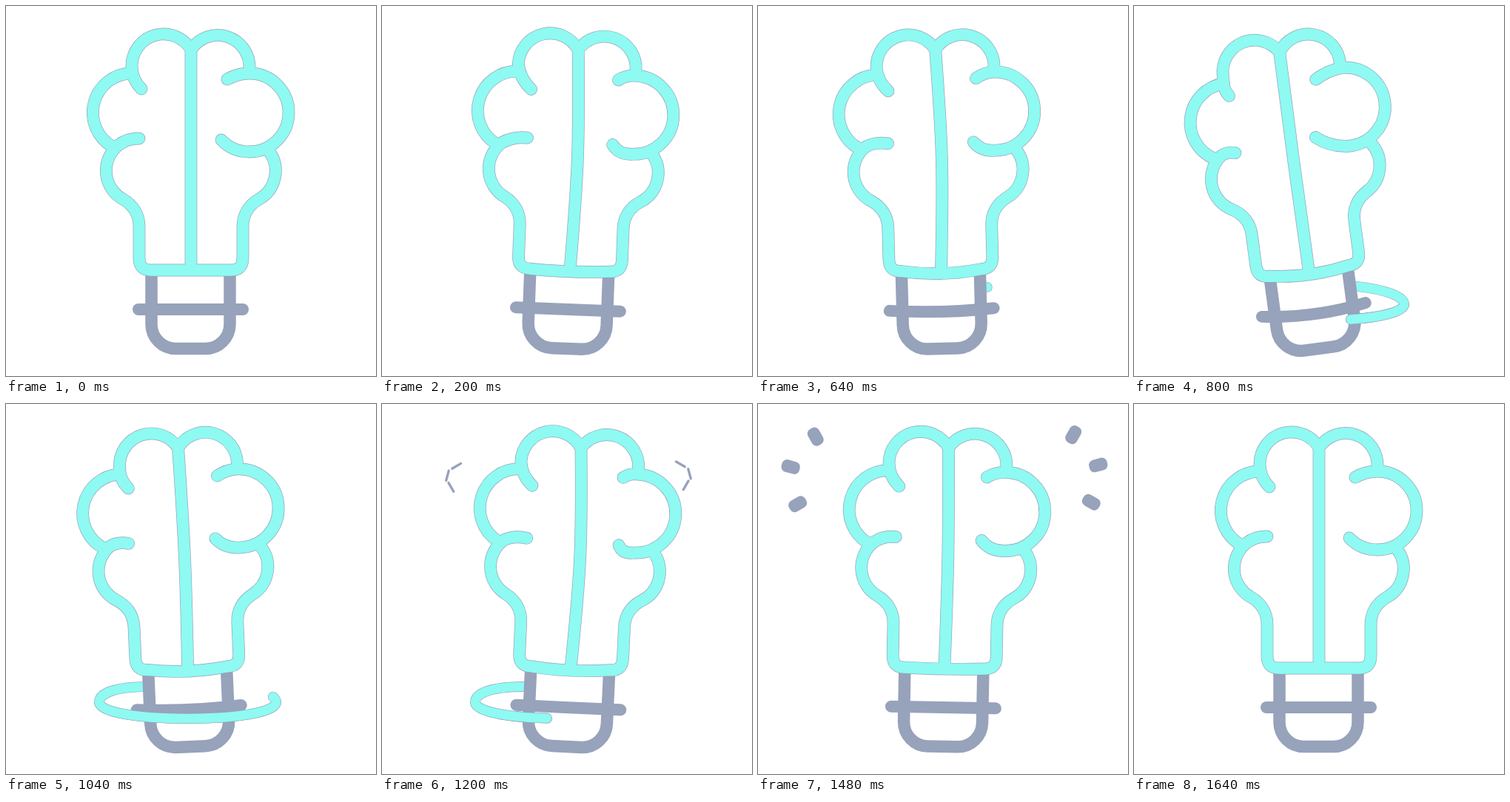
Recreate the animation shown at these times as an HTML page with a canvas. Size 500 by 500 pixels, loop 2.16 s.

```html
<!DOCTYPE html>
<html lang="en">
<head>
<meta charset="utf-8">
<title>Bright idea</title>
<style>
  html, body { margin: 0; width: 100%; height: 100%; overflow: hidden; background: #fff; }
  canvas { display: block; width: 100vw; height: 100vh; }
</style>
</head>
<body>
<canvas id="stage" width="500" height="500"></canvas>
<script>
const ctx = document.getElementById('stage').getContext('2d');
const CYAN = '#8efaf2', GRAY = '#97a2bb';
const LOOP = 2160, STEP = 40, RAD = Math.PI / 180;

// angle, then x/y shifts of the four fold tips, then bends of midline, rim and bar
const POSES = [
  [0, [0, 0, 0, 0, 0, 0, 0, 0, 0, 0, 0, 0]],
  [440, [5, 13, 6, 13.5, 3, 16, -3, 24, 10, 11, 4, 0]],
  [840, [-8, -9, -4, -8, 7, -6, 3, -9, -2, -1, 5, 6]],
  [1240, [3, 4, 1, 3, 5, 10.5, -3, 17, 7, 6, 3, 0]],
  [1640, [0, 0, 0, 0, 0, 0, 0, 0, 0, 0, 0, 0]]
];

// center and outward direction of the rays on the left side
const RAYS = [[87.5, 61, 240], [63, 90, 195], [70.5, 125.5, 150]];

const SWIRL = new Path2D('M302 379C338 383 365 392 365 403C365 417 310 425 245 425' +
  'C180 425 126 417 126 403C126 390 150 382 192 382');
const SWIRL_LENGTH = 394;

function ease(t, from, to) {
  const u = Math.min(1, Math.max(0, (t - from) / (to - from)));
  return u * u * (3 - 2 * u);
}

function poseAt(t) {
  let i = 0;
  while (i < POSES.length - 2 && t > POSES[i + 1][0]) i++;
  const [from, a] = POSES[i], [to, b] = POSES[i + 1];
  const k = ease(t, from, to);
  return a.map((v, n) => v + (b[n] - v) * k);
}

function stroke(path, color, width, cap = 'round') {
  ctx.lineCap = cap;
  ctx.lineJoin = 'round';
  ctx.strokeStyle = color;
  ctx.lineWidth = width;
  ctx.stroke(path);
}

function drawSwirl(t) {
  const head = ease(t, 600, 1080) * SWIRL_LENGTH;
  const tail = ease(t, 900, 1460) * SWIRL_LENGTH;
  if (head - tail < 0.5) return;
  ctx.save();
  ctx.setLineDash([head - tail, 1000]);
  ctx.lineDashOffset = -tail;
  stroke(SWIRL, GRAY, 13.8);
  stroke(SWIRL, CYAN, 12.6);
  ctx.restore();
}

function drawRays(t) {
  const head = ease(t, 1160, 1440) * 60, tail = ease(t, 1280, 1640) * 60;
  if (head - tail < 0.5) return;
  ctx.fillStyle = GRAY;
  for (const side of [1, -1]) {
    for (const [x, y, angle] of RAYS) {
      ctx.save();
      if (side < 0) {
        ctx.translate(504, -2.5);
        ctx.scale(-1, 1);
      }
      ctx.translate(x, y);
      ctx.rotate(angle * RAD);
      ctx.beginPath();
      ctx.roundRect(tail - 28, -8.5, head - tail, 17, Math.min(7, (head - tail) / 2));
      ctx.fill();
      ctx.restore();
    }
  }
}

function drawBase(barBend) {
  stroke(new Path2D('M196.5 358V430A33 33 0 0 0 229.5 463H269.5A33 33 0 0 0 302.5 430V358'), GRAY, 16.5, 'butt');
  stroke(new Path2D(`M179 410Q250 ${410 + 2 * barBend} 320 410`), GRAY, 16);
}

function drawBulb([, ax, ay, bx, by, cx, cy, dx, dy, mid, rim]) {
  const at = (x, y, sx, sy, k = 1) => `${x + sx * k} ${y + sy * k} `;
  const bow = 250 + mid * 4 / 3;
  const path = new Path2D(
    // upper left lobe and its fold
    `M250 59A43 43 0 0 0 170 81Q${at(170, 99, ax, ay, 0.4)}${at(183, 112, ax, ay)}` +
    // side left lobe
    'M170 91A53 53 0 0 0 144 190' +
    // lower left lobe, neck, rim, lower right lobe
    `M${at(180, 179, bx, by)}Q${at(164, 178.5, bx, by, 0.5)}152 188` +
    'A44 44 0 0 0 158 261C172 269 180 282 180 298V341Q180 357 196 357' +
    `Q250 ${357 + 2 * rim} 304 357Q320 357 320 341V298` +
    'C320 282 328 269 342 261A44 44 0 0 0 356 197' +
    // side right lobe with both folds
    `M${at(299, 99, cx, cy)}Q${at(313, 91, cx, cy, 0.5)}329 91` +
    `A53 53 0 0 1 329 197Q${at(306, 197, dx, dy, 0.4)}${at(291, 181, dx, dy)}` +
    // upper right lobe and midline
    'M250 59A43 43 0 0 1 329 84' +
    `M250 56C${bow} 190 ${bow} 225 250 ${357 + rim}`
  );
  stroke(path, GRAY, 16.8);
  stroke(path, CYAN, 15.4);
}

function tilted(angle, draw) {
  ctx.save();
  ctx.translate(250, 460);
  ctx.rotate(angle * RAD);
  ctx.translate(-250, -460);
  draw();
  ctx.restore();
}

function frame() {
  const t = Math.floor((performance.now() % LOOP) / STEP) * STEP;
  const pose = poseAt(t);
  ctx.fillStyle = '#fff';
  ctx.fillRect(0, 0, 500, 500);

  drawRays(t);
  drawSwirl(t);
  tilted(pose[0], () => drawBase(pose[11]));

  // the near half of the swirl passes in front of the base
  ctx.save();
  ctx.beginPath();
  ctx.rect(0, 402, 500, 98);
  ctx.clip();
  drawSwirl(t);
  ctx.restore();

  tilted(pose[0], () => drawBulb(pose));
  requestAnimationFrame(frame);
}
frame();
</script>
</body>
</html>
```
